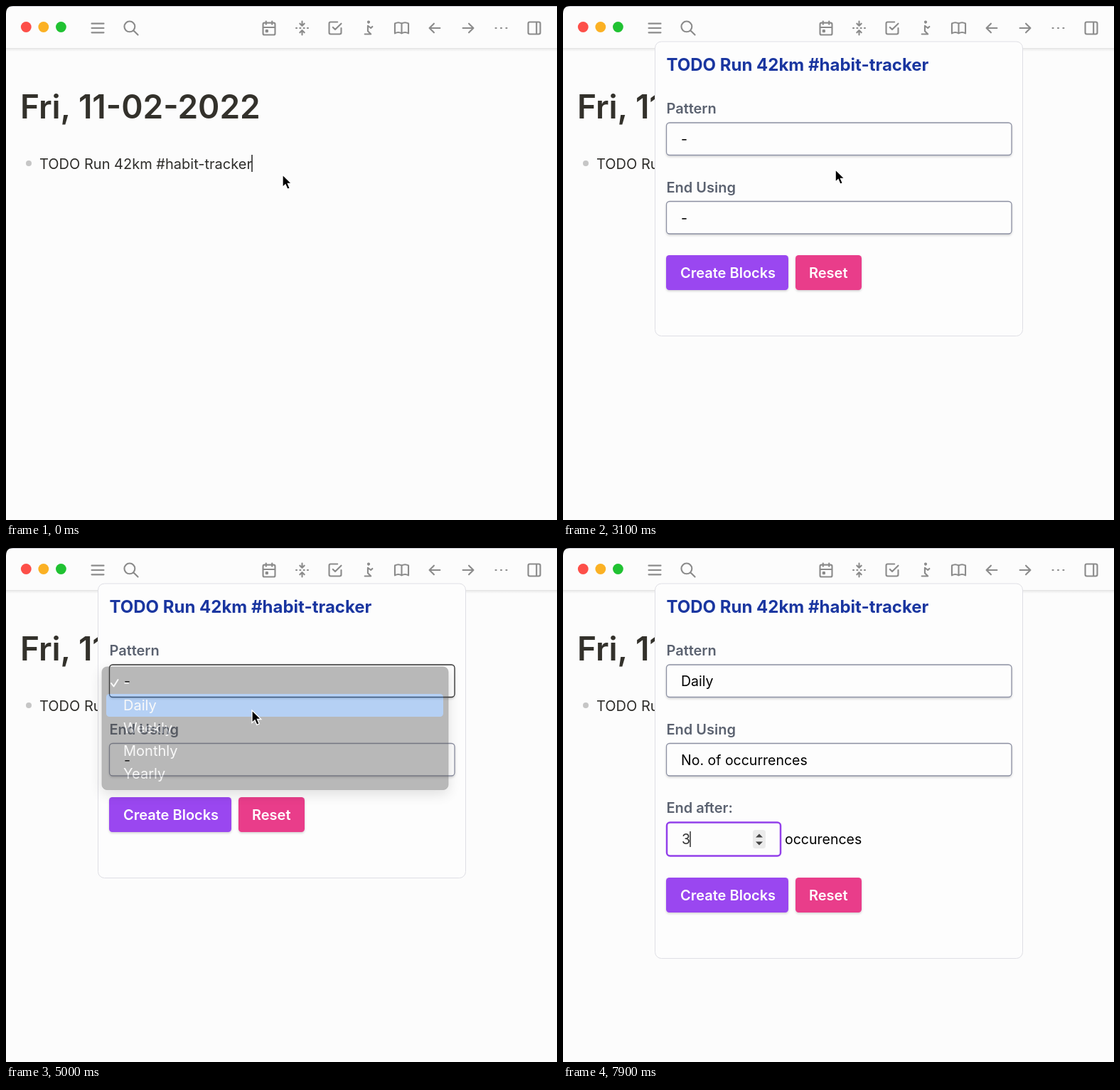
Write an HTML page that moves like this. It is 775x722 px and loops after 8 s.

```html
<!DOCTYPE html>
<html lang="en">
<head>
<meta charset="utf-8">
<title>Recurring task</title>
<style>
html, body { margin: 0; width: 100%; height: 100%; overflow: hidden; background: #fcfcfc; }
svg { display: block; width: 775px; height: 722px; font-family: Inter, "Liberation Sans", sans-serif; }
text { white-space: pre; }
.body { font-size: 20px; fill: #2f2e2b; }
.value { font-size: 19.5px; fill: #000; }
.label { font-size: 20px; font-weight: 600; fill: #5b6270; }
.button { font-size: 20px; font-weight: 600; fill: #fff; }
.item { font-size: 17px; fill: #2b2b2b; }
.option { font-size: 20px; fill: #f4f4f4; }
.icon { fill: none; stroke: #8b8b8b; stroke-width: 2; stroke-linecap: round; stroke-linejoin: round; }
.field { fill: #fdfdfd; stroke: #8c90a2; stroke-width: 1.3; }
</style>
</head>
<body>
<svg id="stage" viewBox="0 0 775 722">
  <defs>
    <filter id="soft" x="-20%" y="-20%" width="140%" height="150%">
      <feDropShadow dx="0" dy="6" stdDeviation="8" flood-color="#000" flood-opacity=".17"/>
    </filter>
    <filter id="lift" x="-10%" y="-20%" width="120%" height="160%">
      <feDropShadow dx="0" dy="1.5" stdDeviation="1.5" flood-color="#000" flood-opacity=".18"/>
    </filter>
    <filter id="deep" x="-20%" y="-20%" width="140%" height="160%">
      <feDropShadow dx="0" dy="6" stdDeviation="9" flood-color="#000" flood-opacity=".3"/>
    </filter>
    <linearGradient id="fade" x2="0" y2="1">
      <stop stop-color="#000" stop-opacity=".09"/><stop offset="1" stop-color="#000" stop-opacity="0"/>
    </linearGradient>
    <clipPath id="menuClip"><rect x="353" y="238" width="369" height="454" rx="4"/></clipPath>
  </defs>

  <rect width="775" height="722" fill="#fcfcfc"/>
  <rect y="59" width="775" height="5" fill="url(#fade)"/>
  <path d="M0 59.5H775" stroke="#e4e4e4"/>
  <path d="M0 .5H775" stroke="#c9c9d2"/>
  <path d="M0 0H10Q0 0 0 11Z" fill="#000"/>
  <circle cx="28.3" cy="29.5" r="7.4" fill="#fd4f49"/>
  <circle cx="52.8" cy="29.5" r="7.4" fill="#fbb124"/>
  <circle cx="77.4" cy="29.5" r="7.4" fill="#20c232"/>
  <g id="icons" class="icon"></g>

  <text x="20" y="157.5" font-size="46" font-weight="600" fill="#33312b">Fri, 11-02-2022</text>
  <circle cx="32" cy="221" r="4" fill="#c6c6c6"/>
  <text id="task" class="body" x="47" y="228.5"></text>
  <path id="caret" d="M0 209V233" stroke="#111" stroke-width="1.4"/>

  <g id="menu">
    <rect x="353" y="238" width="369" height="454" rx="4" fill="#fdfdfd" filter="url(#soft)"/>
    <g clip-path="url(#menuClip)">
      <rect x="354" y="278" width="361" height="44" fill="#f2f2f2"/>
      <rect x="715" y="238" width="7" height="454" fill="#efefef"/>
      <rect x="715" y="238" width="7" height="60" fill="#c9c9c9"/>
      <text x="364" y="262.5" font-size="14" fill="#cbd5e1">BASIC</text>
      <g id="items"></g>
    </g>
  </g>

  <g id="modal">
    <rect id="panel" x="129.5" y="50" width="517" rx="9" fill="#fdfdfd" stroke="#dfdfe5"/>
    <text x="145.5" y="91" font-size="24" font-weight="700" fill="#1a36a0">TODO Run 42km #habit-tracker</text>
    <text class="label" x="145.5" y="151">Pattern</text>
    <rect id="patternBox" class="field" x="145.5" y="164" width="485.5" height="45.5" rx="4.5" filter="url(#lift)"/>
    <text id="pattern" class="value" x="166" y="194"></text>
    <text class="label" x="145.5" y="261.5">End Using</text>
    <rect id="endBox" class="field" x="145.5" y="274.5" width="485.5" height="45.5" rx="4.5" filter="url(#lift)"/>
    <text id="end" class="value" x="166" y="304.5"></text>
    <g id="after">
      <text class="label" x="145.5" y="372">End after:</text>
      <rect id="countBox" class="field" x="146" y="385.5" width="160" height="47" rx="4.5"/>
      <text id="count" class="value" x="167" y="416" style="fill:#333"></text>
      <path id="countCaret" stroke="#111" stroke-width="1.3"/>
      <g id="spinner">
        <rect x="267" y="396" width="18" height="26" rx="4" fill="#ebebeb"/>
        <path d="M271 406.5L276 401.5L281 406.5ZM271 412.5L276 417.5L281 412.5Z" fill="#444"/>
      </g>
      <text class="value" x="312" y="416">occurences</text>
    </g>
    <g id="buttons">
      <rect x="145" y="350" width="172" height="49" rx="4.5" fill="#9a47f0" filter="url(#lift)"/>
      <text class="button" x="165" y="382">Create Blocks</text>
      <rect x="327" y="350" width="93" height="49" rx="4.5" fill="#e93d8a" filter="url(#lift)"/>
      <text class="button" x="346" y="382">Reset</text>
    </g>
  </g>

  <g id="patternList"></g>
  <g id="endList"></g>
  <path id="pointer" d="M0 0V17.5L4 13.8L6.8 20.3L10.2 18.9L7.4 12.5H12.8Z" fill="#000" stroke="#fff" stroke-width="1.3"/>
</svg>
<script>
const LOOP = 8000;
const $ = id => document.getElementById(id);
const show = (id, on) => $(id).setAttribute("visibility", on ? "visible" : "hidden");
const clamp = v => Math.max(0, Math.min(1, v));
const between = (t, a, b) => t >= a && t < b;

const icons = [
  [129, "M4 6h16M4 12h16M4 18h16"],
  [176, "M3 10a7 7 0 1 0 14 0a7 7 0 1 0 -14 0M21 21l-6 -6"],
  [370, "M6 5h12a2 2 0 0 1 2 2v12a2 2 0 0 1 -2 2h-12a2 2 0 0 1 -2 -2v-12a2 2 0 0 1 2 -2zM16 3v4M8 3v4M4 11h16M8 15h2v2h-2z"],
  [416.5, "M12 3v6l3 -3M9 6l3 3M12 21v-6l3 3M9 18l3 -3M4 12h1M9 12h1M14 12h1M19 12h1"],
  [463, "M9 11l3 3l8 -8M20 12v6a2 2 0 0 1 -2 2h-12a2 2 0 0 1 -2 -2v-12a2 2 0 0 1 2 -2h9"],
  [510, "M11 4a1 1 0 1 0 2 0a1 1 0 1 0 -2 0M7 20h8l-4 -4v-7l4 3l2 -2"],
  [556.5, "M3 19a9 9 0 0 1 9 0a9 9 0 0 1 9 0M3 6a9 9 0 0 1 9 0a9 9 0 0 1 9 0M3 6v13M12 6v13M21 6v13"],
  [603, "M5 12h14M5 12l6 6M5 12l6 -6"],
  [650, "M5 12h14M13 18l6 -6M13 6l6 6"],
  [696.5, "M4.5 12h1M11.5 12h1M18.5 12h1"],
  [743, "M6 4h12a2 2 0 0 1 2 2v12a2 2 0 0 1 -2 2h-12a2 2 0 0 1 -2 -2v-12a2 2 0 0 1 2 -2zM15 4v16"]
];
const ICON = 1.06;
$("icons").innerHTML = icons.map(([x, d]) =>
  `<path transform="translate(${x - 12 * ICON} ${31 - 12 * ICON}) scale(${ICON})" d="${d}"/>`).join("");

const items = ["Page reference", "Page embed", "Block reference", "Block embed", "Link",
  "Image link", "Underline", "Template", "Upload an asset", "Left"];
$("items").innerHTML = items.map((s, i) =>
  `<text class="item" x="373" y="${305.8 + 44.2 * i}">${s}</text>`).join("");

function buildList(id, top, options) {
  const rows = options.map((s, i) =>
    `<text class="option" x="165" y="${top + 28.5 + 32 * i}">${s}</text>`).join("");
  $(id).innerHTML = `
    <rect x="135" y="${top}" width="487" height="${12.5 + 32 * options.length}" rx="7"
      fill="#515151" stroke="#3d3d3d" stroke-width=".8" filter="url(#deep)"/>
    <rect x="141" y="${top + 38}" width="474" height="32" rx="4.5" fill="#4a8ee8"/>
    <path d="M148 ${top + 23}l3.5 4.5l6 -9.5" fill="none" stroke="#f4f4f4" stroke-width="2"
      stroke-linecap="round" stroke-linejoin="round"/>${rows}`;
}
buildList("patternList", 167, ["-", "Daily", "Weekly", "Monthly", "Yearly"]);
buildList("endList", 277.5, ["-", "No. of occurrences", "Specific Date"]);

// time, x, y
const route = [
  [0, 389, 237], [3000, 389, 237], [3400, 352, 192], [3500, 351, 194], [3700, 349, 216],
  [4300, 346, 228], [5200, 346, 228], [5700, 300, 296], [5900, 298, 298], [6200, 296, 326],
  [6700, 296, 326], [7100, 205, 406], [LOOP, 205, 406]
];
function pointerAt(t) {
  const i = route.findIndex(p => p[0] > t);
  const [t0, x0, y0] = route[i - 1], [t1, x1, y1] = route[i];
  const k = (t - t0) / (t1 - t0), e = k * k * (3 - 2 * k);
  return [x0 + (x1 - x0) * e, y0 + (y1 - y0) * e];
}

function setList(id, t, open, close, gone) {
  show(id, between(t, open, gone));
  $(id).setAttribute("opacity", 1 - clamp((t - close) / (gone - close)));
}
function focusField(id, on) {
  $(id).style.stroke = on ? "#333" : "";
}

function draw(t) {
  const slash = between(t, 900, 1600);
  const modal = t >= 2900, expanded = t >= 6700;
  const focused = t >= 7200, typed = t >= 7600;

  $("task").textContent = "TODO Run 42km #habit-tracker " + (slash ? "/" : "");
  $("caret").setAttribute("transform", `translate(${slash ? 353.5 : 346} 0)`);
  show("caret", !modal);
  show("menu", slash);

  show("modal", modal);
  $("panel").setAttribute("height", expanded ? 526.5 : 413.5);
  $("buttons").setAttribute("transform", `translate(0 ${expanded ? 113 : 0})`);
  $("pattern").textContent = t < 5100 ? "-" : "Daily";
  $("end").textContent = t < 6600 ? "-" : "No. of occurrences";
  focusField("patternBox", between(t, 3500, 5800));
  focusField("endBox", between(t, 5800, 7200));

  $("after").style.display = expanded ? "" : "none";
  $("countBox").style.stroke = focused ? "#9340ea" : "";
  $("countBox").style.strokeWidth = focused ? 2.5 : "";
  $("count").textContent = typed ? "3" : "";
  $("countCaret").setAttribute("d", `M${typed ? 179 : 168} 398V420`);
  $("countCaret").style.display = focused ? "" : "none";
  $("spinner").style.display = focused ? "" : "none";

  setList("patternList", t, 3500, 4880, 5080);
  setList("endList", t, 5800, 6340, 6540);

  const [x, y] = pointerAt(t);
  $("pointer").setAttribute("transform", `translate(${x} ${y})`);
  show("pointer", t < 900 || between(t, 3000, 7600));
}

const start = performance.now();
function tick(now) {
  draw(Math.max(0, now - start) % LOOP);
  requestAnimationFrame(tick);
}
draw(0);
requestAnimationFrame(tick);
</script>
</body>
</html>
```
